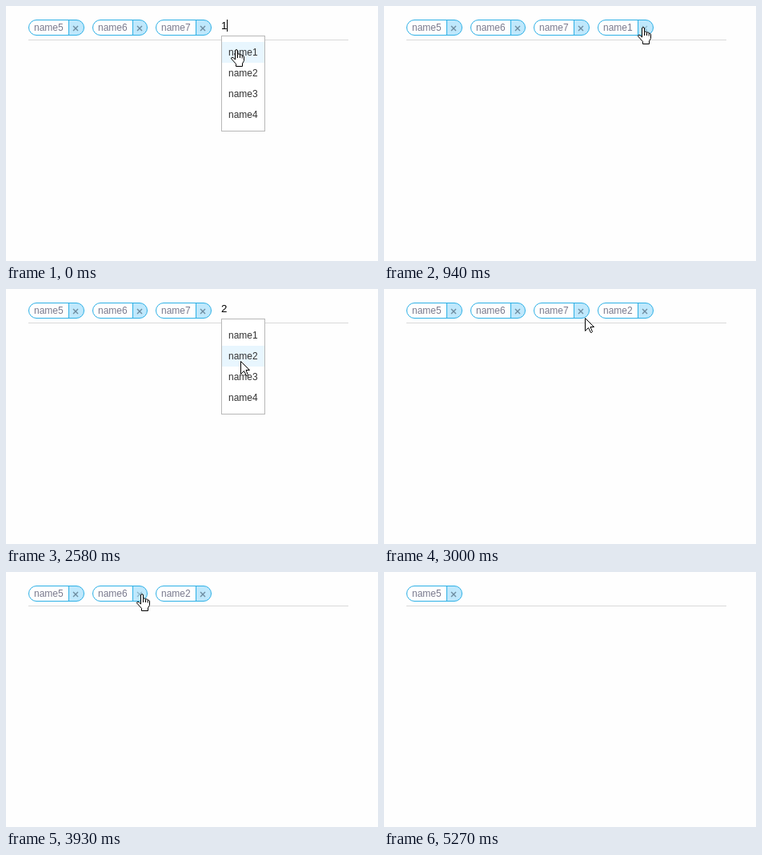
Write an HTML page that moves like this. It is 465 px wide and 319 px high and loops after 5.42 s.

```html
<!DOCTYPE html>
<html lang="en">
<head>
<meta charset="utf-8">
<title>Tag input</title>
<style>
  html, body { margin: 0; width: 100%; height: 100%; overflow: hidden; background: #fefefe; }
  svg { display: block; font: 12px "Liberation Sans", Arial, sans-serif; }
  .tag { fill: #7a7a8e; }
  .item { fill: #333; }
  .typed { font-size: 13.33px; }
</style>
</head>
<body>
<svg id="stage" width="465" height="319" viewBox="0 0 465 319"></svg>
<script>
const LOOP = 5420;
const BLUE = '#2db0e6', PALE = '#bfe8fc';

// list: null is closed, -1 is open with no row under the pointer
const start = { tags: '567', hover: -1, typed: '1', caret: true, list: 0, cursor: ['hand', 281, 54] };
const steps = [
  [150, { tags: '5671', typed: '', caret: false, list: null }],
  [270, { cursor: ['arrow', 286, 54] }],
  [520, { cursor: ['arrow', 286, 53] }],
  [670, { cursor: ['arrow', 303, 39] }],
  [790, { cursor: ['hand', 315, 29], hover: 3 }],
  [940, { cursor: ['hand', 317, 26] }],
  [1250, { tags: '567', cursor: ['arrow', 321, 26], hover: -1 }],
  [1400, { cursor: ['beam', 294, 21] }],
  [1550, { cursor: ['beam', 286, 21] }],
  [1670, { cursor: ['beam', 283, 21], caret: true }],
  [1820, { cursor: ['beam', 282, 21] }],
  [1940, { list: -1, caret: false }],
  [2190, { cursor: ['arrow', 284, 42] }],
  [2340, { cursor: ['arrow', 291, 74], list: 1 }],
  [2460, { cursor: ['arrow', 293, 93], typed: '2', caret: true }],
  [2580, { cursor: ['arrow', 293, 90], caret: false }],
  [2730, { tags: '5672', typed: '', list: null }],
  [2880, { cursor: ['arrow', 268, 58] }],
  [3000, { cursor: ['arrow', 251, 36] }],
  [3120, { cursor: ['hand', 241, 31], hover: 2 }],
  [3240, { cursor: ['hand', 241, 27] }],
  [3390, { tags: '562' }],
  [3510, { cursor: ['arrow', 194, 35], hover: -1 }],
  [3660, { cursor: ['arrow', 179, 31] }],
  [3780, { cursor: ['hand', 165, 27], hover: 1 }],
  [3930, { cursor: ['hand', 163, 27] }],
  [4080, { tags: '52' }],
  [4200, { cursor: ['hand', 161, 31] }],
  [4320, { cursor: ['hand', 163, 29] }],
  [4440, { cursor: ['hand', 164, 28] }],
  [4870, { tags: '5', cursor: ['arrow', 170, 28], hover: -1 }],
  [5000, { cursor: ['arrow', 300, 190] }],
  [5120, { cursor: ['arrow', 396, 317] }],
  [5270, { cursor: null }],
];

const cursors = {
  arrow: '<path d="M.5 .5V16.5L4.5 12.5 7.5 18.5H8.5L9.5 17.5 7 11.5H11.5Z"/>',
  hand: `<path d="M5.5 13V2C5.5 .2 8.5 .2 8.5 2V6.5C9 5.6 11.5 5.8 11.5 7.2C12.2 6.4 14 6.8 14.2 8.2
    C15.5 7.8 16.5 8.6 16.5 10V14.5L14.5 18V21.5H6.5V18.5L.7 12C.2 10.5 1.5 9.7 3 10.6Z"/>
    <path d="M8.5 6.5V11M11.5 7.2V11M14.2 8.2V11.5"/>`,
  beam: '<path d="M0 .5h3m1 0h3M3.5 1v14M0 15.5h3m1 0h3"/>',
};

const text = (cls, x, y, value) => `<text class="${cls}" x="${x}" y="${y}">${value}</text>`;
const rect = (x, y, w, h, attrs) => `<rect x="${x}" y="${y}" width="${w}" height="${h}" ${attrs}/>`;

function drawTag(digit, slot, hovered) {
  const left = 28 + 79.69 * slot;
  const x = Math.round(left), right = Math.round(left + 69.69), split = x + 50;
  const cross = hovered ? '#8fb8cc' : '#6e8ca0';
  return `<path d="M${split} 17.5H${right - 10}a9.5 9.5 0 0 1 0 19H${split}z" fill="${PALE}"/>
    <path d="M${split + .5} 17.5v19" stroke="${BLUE}"/>` +
    rect(x + .5, 17.5, right - x - 1, 19, `rx="9.5" fill="none" stroke="${BLUE}"`) +
    text('tag', x + 7, 31, 'name' + digit) +
    `<path d="M${split + 6} 25l6 6m0-6l-6 6" stroke="${cross}" stroke-width="1.4"/>`;
}

function drawList(active) {
  let out = rect(269.5, 37.5, 54, 119, 'fill="#fff" stroke="#b8b8b8"');
  if (active >= 0) out += rect(270, 45 + 26 * active, 53, 26, 'fill="#e8f6fe"');
  for (let i = 0; i < 4; i++) out += text('item', 278, 62 + 26 * i, 'name' + (i + 1));
  return out;
}

function drawCursor([kind, x, y]) {
  return `<g transform="translate(${x} ${y})" fill="#fff" stroke="#000">${cursors[kind]}</g>`;
}

function draw(s) {
  let out = rect(28, 42, 400, 1, 'fill="#d9d9d9"');
  [...s.tags].forEach((digit, i) => out += drawTag(digit, i, i === s.hover));
  out += text('typed', 269, 29, s.typed);
  if (s.caret) out += rect(s.typed ? 276 : 269, 17, 1, 15, '');
  if (s.list !== null) out += drawList(s.list);
  if (s.cursor) out += drawCursor(s.cursor);
  return out;
}

const stage = document.getElementById('stage');
let shown = -1;

function tick() {
  const t = performance.now() % LOOP;
  const passed = steps.filter(([at]) => at <= t);
  if (passed.length !== shown) {
    shown = passed.length;
    stage.innerHTML = draw(Object.assign({}, start, ...passed.map(([, change]) => change)));
  }
  requestAnimationFrame(tick);
}
tick();
</script>
</body>
</html>
```
